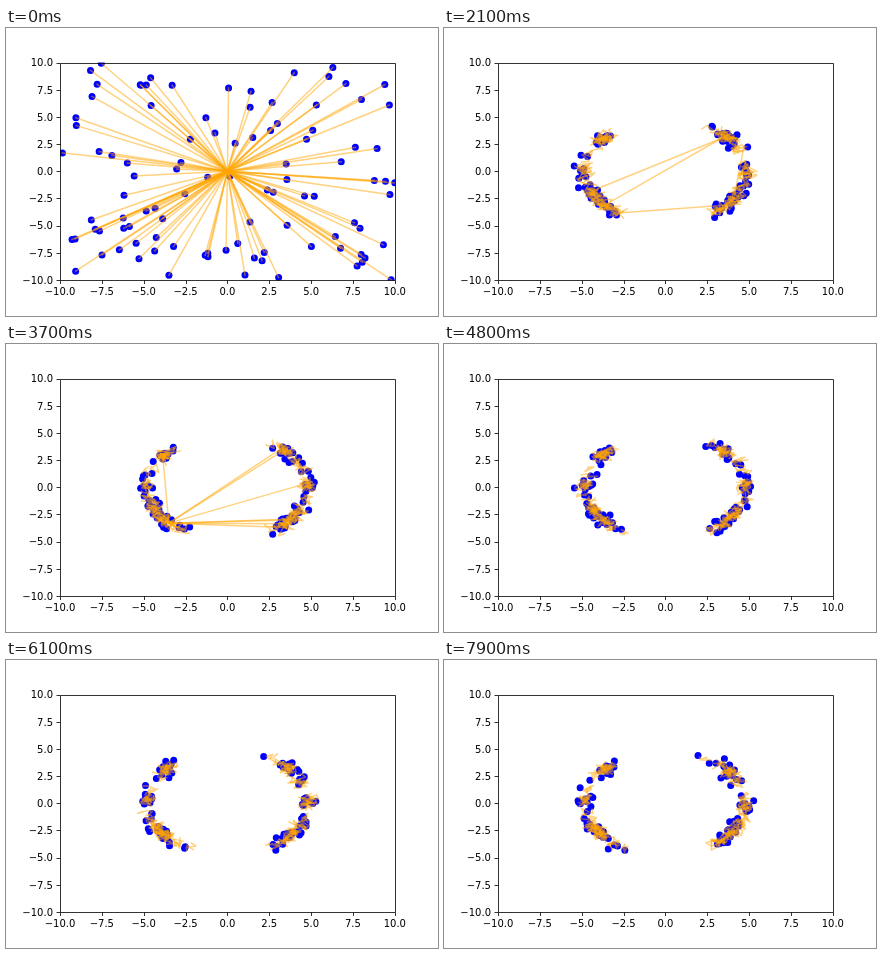
An HTML page with a canvas that plays this animation: 432 by 288 pixels, repeating every 8000 ms.

```html
<!DOCTYPE html>
<html lang="en">
<head>
<meta charset="utf-8">
<title>Particles settling on a ring</title>
<style>
  html, body { margin: 0; width: 100%; height: 100%; overflow: hidden; background: #fff; }
  canvas, svg { position: absolute; left: 0; top: 0; width: 432px; height: 288px; }
  text { font: 10px "DejaVu Sans", sans-serif; }
  path { fill: none; stroke: #000; stroke-width: .8; }
</style>
</head>
<body>
<canvas id="plot" width="432" height="288"></canvas>
<svg id="axes" viewBox="0 0 432 288"></svg>
<script>
const LEFT = 54, TOP = 34.56, WIDTH = 334.8, HEIGHT = 217.44;
const STEP_MS = 100, STEPS = 80, COUNT = 100, TRAIL = 5;
const RADIUS = 4.8, MAX_ANGLE = Math.PI / 3;
const toX = x => LEFT + (x + 10) / 20 * WIDTH;
const toY = y => TOP + (10 - y) / 20 * HEIGHT;
const mix = (a, b, f) => a + (b - a) * f;

// Seeded random number in 0..1 from three integers.
function random(i, step, channel) {
  let h = Math.imul(i + 1, 0x9E3779B1) ^ Math.imul(step + 1, 0x85EBCA6B) ^ Math.imul(channel + 1, 0xC2B2AE35);
  h = Math.imul(h ^ h >>> 15, 0x2C1B3C6D);
  h = Math.imul(h ^ h >>> 12, 0x297A2D39);
  return ((h ^ h >>> 15) >>> 0) / 2 ** 32;
}

// Roughly normal, standard deviation 1.
function noise(i, step, channel) {
  let sum = -1.5;
  for (let n = 0; n < 3; n++) sum += random(i, step, channel * 3 + n);
  return sum * 2;
}

// Each particle keeps to its half: side is -1 or 1, a is its elevation.
const particles = Array.from({ length: COUNT }, (_, i) => {
  const x = random(i, 0, 20) * 20 - 10, y = random(i, 0, 21) * 20 - 10;
  return { i, x, y, side: Math.sign(x), r: Math.hypot(x, y), a: Math.atan2(y, Math.abs(x)) };
});

// Squeezes elevations away from the poles and into three slowly drifting groups.
function ringAngle(p, step) {
  const u = p.a / (Math.PI / 2);
  const drift = .6 * Math.sin(step / 12 + p.side);
  return MAX_ANGLE * u - .085 * Math.sin(9 * u + drift);
}

function place(p, step, spread, channel) {
  if (step < 0) return [toX(0), toY(0)];
  if (step === 0) return [toX(p.x), toY(p.y)];
  const r = mix(RADIUS, p.r, .72 ** step);
  const a = mix(ringAngle(p, step), p.a, .75 ** step);
  const s = spread + .8 * .8 ** step;
  const x = p.side * r * Math.cos(a) + s * noise(p.i, step, channel);
  const y = r * Math.sin(a) + s * noise(p.i, step, channel + 1);
  return [toX(x), toY(y)];
}
const dotAt = (p, step) => place(p, step, .25, 2);
const trailAt = (p, step) => place(p, step, .25, 0);

// Bursts of long hops: between random particles, or all out of one hub.
const BURSTS = [
  { at: 17, count: 5 },
  { at: 33, count: 9, hub: [toX(-3.5), toY(-3.3)] }
];
const hops = BURSTS.flatMap(({ at, count, hub }) => Array.from({ length: count }, (_, n) => {
  const pick = channel => trailAt(particles[Math.floor(random(n, at, channel) * COUNT)], at);
  return { at: at + n % 4, line: [hub || pick(30), pick(31)] };
}));

const ctx = document.getElementById("plot").getContext("2d");
ctx.beginPath();
ctx.rect(LEFT, TOP, WIDTH + .7, HEIGHT + .5);
ctx.clip();
ctx.lineWidth = 1.5;
ctx.lineCap = "square";
ctx.lineJoin = "round";
ctx.strokeStyle = "rgba(255,165,0,.5)";
ctx.fillStyle = "#00f";

function dot([x, y]) {
  ctx.beginPath();
  ctx.arc(x, y, 3.5, 0, 7);
  ctx.fill();
}

function stroke(points) {
  ctx.beginPath();
  points.forEach(([x, y]) => ctx.lineTo(x, y));
  ctx.stroke();
}

function draw(step) {
  ctx.clearRect(0, 0, 432, 288);
  for (const p of particles) dot(dotAt(p, step));
  for (const p of particles) {
    stroke(Array.from({ length: TRAIL + 1 }, (_, n) => trailAt(p, step - TRAIL + n)));
  }
  for (const { at, line } of hops) {
    if (step >= at && step < at + TRAIL) stroke(line);
  }
}

function drawAxes() {
  const snap = v => Math.floor(v + .5) + .5;
  let d = "M54.5 35.5H389.5V252.5H54.5Z", labels = "";
  for (let v = -10; v <= 10; v += 2.5) {
    const x = toX(v), y = toY(v), label = v.toFixed(1).replace("-", "\u2212");
    d += `M${snap(x)} 252.5V256M54.5 ${snap(y)}H50.5`;
    labels += `<text x="${x}" y="267" text-anchor="middle">${label}</text>` +
              `<text x="47" y="${Math.round(y + 3.8)}" text-anchor="end">${label}</text>`;
  }
  document.getElementById("axes").innerHTML = `<path d="${d}"/>${labels}`;
}

drawAxes();
const start = performance.now();
let shown = -1;
function tick() {
  const step = Math.floor((performance.now() - start) / STEP_MS) % STEPS;
  if (step !== shown) draw(shown = step);
  requestAnimationFrame(tick);
}
tick();
</script>
</body>
</html>
```
